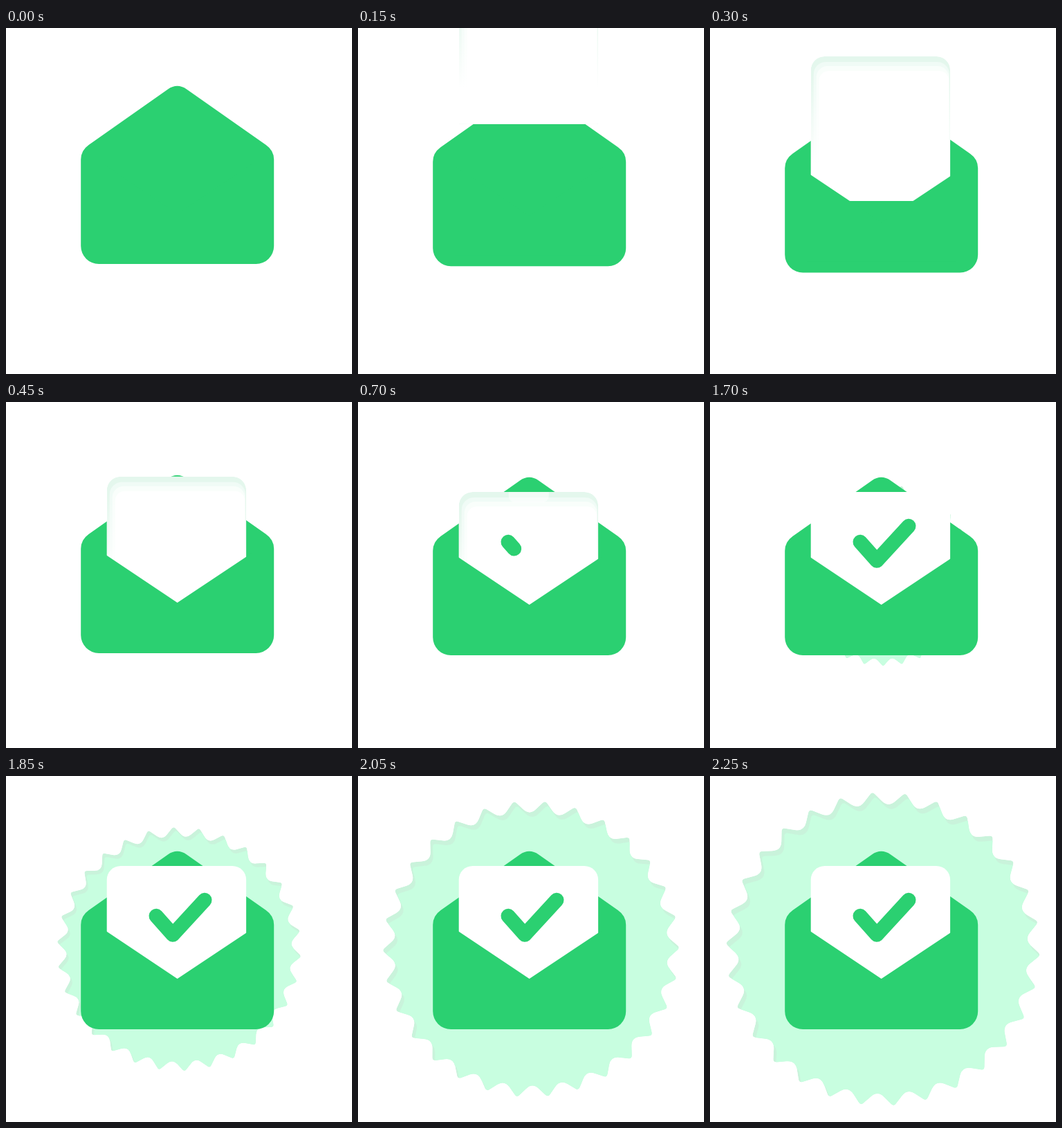
An HTML page for the animation above (2300 ms loop, 500 by 500 pixels).

```html
<!DOCTYPE html>
<html lang="en">
<head>
<meta charset="utf-8">
<title>Letter confirmed</title>
<style>
  html, body { margin: 0; width: 100%; height: 100%; overflow: hidden; background: #fff; }
  svg { display: block; width: 100%; height: 100%; }
</style>
</head>
<body>
<svg viewBox="0 0 500 500">
  <defs>
    <path id="star"/>
    <path id="sheet" d="M0 209V20A20 20 0 0 1 20 0H181.4A20 20 0 0 1 201.4 20V209Z"/>
    <clipPath id="starClip"><use href="#star" id="clipStar"/></clipPath>
    <clipPath id="sheetClip"><use href="#sheet"/></clipPath>
    <linearGradient id="fade" x1="0" y1="0" x2="0" y2="1">
      <stop offset=".12" stop-color="#fff" stop-opacity="0"/>
      <stop offset=".75" stop-color="#fff"/>
    </linearGradient>
  </defs>

  <g id="badge" clip-path="url(#starClip)">
    <use href="#star" id="rim" fill="#c9f3db"/>
    <use href="#star" id="face" fill="#c8fee0"/>
  </g>

  <path id="back" fill="#2bd071" d="M108.2 215Q108.2 202 119.5 194L234 113.4Q247.5 104.2 261 113.4L375.7 194Q387.2 202 387.2 215V340A26 26 0 0 1 361.2 366H134.2A26 26 0 0 1 108.2 340Z"/>

  <g id="paper">
    <use href="#sheet" fill="#fff"/>
    <g id="shade" clip-path="url(#sheetClip)">
      <use href="#sheet" fill="#e4f7ed"/>
      <rect x="4" y="8" width="196.4" height="220" rx="18" fill="#f0fbf6"/>
      <rect x="8" y="14" width="191.4" height="220" rx="16" fill="#f9fefb"/>
      <rect x="12" y="21" width="187.4" height="220" rx="14" fill="#fff"/>
      <rect id="glow" x="72" y="-8" width="58" height="23" rx="9" fill="#fff" opacity=".55"/>
      <rect width="201.4" height="209" fill="url(#fade)"/>
    </g>
  </g>

  <path id="front" fill="#2bd071" d="M140 221L247.6 293 355 221.5V350H140Z"/>

  <path id="check" d="M217 202.3L241 229.3 287 179.3" pathLength="1" fill="none"
    stroke="#2bd071" stroke-width="21" stroke-linecap="round" stroke-linejoin="round"/>
</svg>

<script>
const LOOP = 2300, STEP = 50, TEETH = 30;
const el = id => document.getElementById(id);
const set = (id, name, value) => el(id).setAttribute(name, value);
const show = (id, on) => set(id, 'visibility', on ? 'visible' : 'hidden');

const span = (t, from, to) => Math.min(1, Math.max(0, (t - from) / (to - from)));
const easeOut = u => 1 - (1 - u) ** 2;
const easeInOut = u => u < 0.5 ? 2 * u * u : 1 - 2 * (1 - u) ** 2;

// Toothed disc around 0,0: pointed tips, rounder valleys.
function starPath(outer, inner) {
  const corner = i => {
    const a = i * Math.PI / TEETH, r = i % 2 ? inner : outer;
    return [r * Math.sin(a), -r * Math.cos(a)];
  };
  const mix = (a, b, k) => a.map((v, i) => v + (b[i] - v) * k);
  const text = p => p.map(v => v.toFixed(2)).join(' ');
  let d = '';
  for (let i = 0; i < 2 * TEETH; i++) {
    const c = corner(i), cut = i % 2 ? 0.4 : 0.16;
    d += (i ? 'L' : 'M') + text(mix(c, corner(i - 1), cut)) +
      'Q' + text(c) + ' ' + text(mix(c, corner(i + 1), cut));
  }
  return d + 'Z';
}
set('star', 'd', starPath(228.3, 204.8));

function draw(t) {
  const lift = -25 * (1 - easeInOut(span(t, 0, 600)));
  set('back', 'transform', `translate(0 ${lift})`);
  set('front', 'transform', `translate(0 ${lift})`);

  const top = 130 - 356 * (1 - easeOut(span(t, 0, 600)));
  set('paper', 'transform', `translate(145.7 ${top})`);
  show('shade', t < 1550);
  show('glow', t >= 500 && t < 1550);

  const drawn = easeInOut(span(t, 550, 1150));
  show('check', drawn > 0);
  set('check', 'stroke-dasharray', drawn < 1 ? `${drawn} 2` : 'none');

  const grow = easeInOut(span(t, 1050, 2250));
  const turn = -3.9 - 48 * (1 - grow);
  const spin = `scale(${grow}) rotate(${turn})`;
  show('badge', t >= 1550);
  set('clipStar', 'transform', `translate(250 250) ${spin}`);
  set('rim', 'transform', `translate(250 250) ${spin}`);
  set('face', 'transform', `translate(${250 + 4 * grow} ${250 + 7 * grow}) ${spin}`);
}

const start = performance.now();
function tick() {
  const t = (performance.now() - start) % LOOP;
  draw(Math.floor(t / STEP) * STEP);
  requestAnimationFrame(tick);
}
tick();
</script>
</body>
</html>
```
